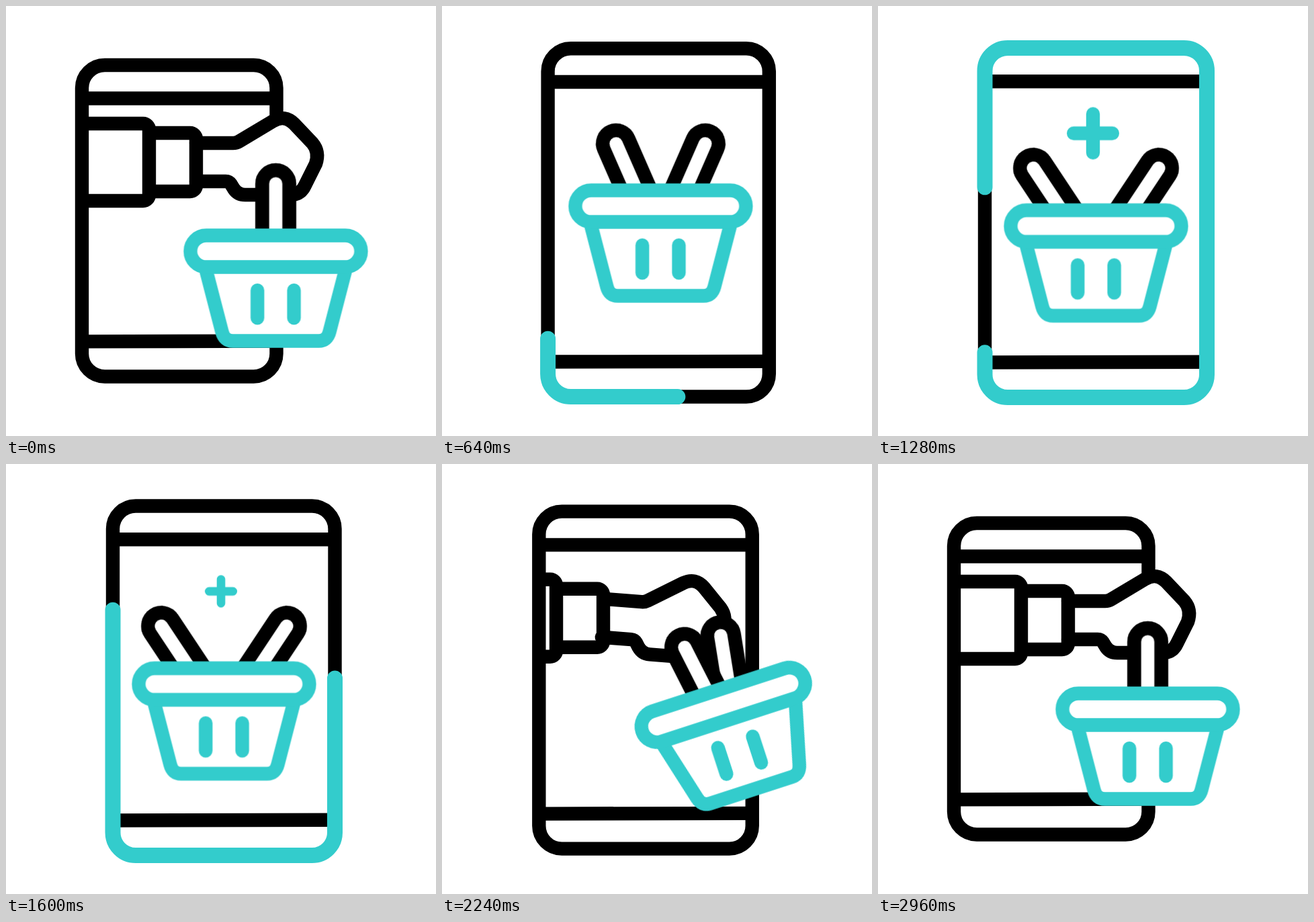
Write an HTML page without scripts that moves like this. It is 640 px wide and 640 px high and loops after 3 s.

```html
<!DOCTYPE html>
<html lang="en">
<head>
<meta charset="utf-8">
<title>Add to basket</title>
<style>
@property --turn { syntax: '<number>'; inherits: false; initial-value: -36; }
@property --head { syntax: '<number>'; inherits: false; initial-value: 0; }
@property --tail { syntax: '<number>'; inherits: false; initial-value: 0; }

html, body { margin: 0; width: 100%; height: 100%; overflow: hidden; background: #fff; }
svg { display: block; width: 100vw; height: 100vh; }

path, rect { fill: none; stroke: #000; stroke-width: 20.4; }
.teal, .teal * { stroke: #3cc; }
.solid { fill: #fff; }
.round { stroke-linecap: round; stroke-linejoin: round; }

.phone, .lines, .trace, .edge, .arm, .hand, .basket, .handle, .plus {
  animation: 3s cubic-bezier(.333, 0, .667, 1) infinite;
}

/* phone */
.phone { animation-name: body; }
.lines { animation-name: lines; }
.edge { animation-name: edge; }
@keyframes body {
  0%, 3.667%, 81.867%, 100% {
    d: path('M368.5 551.5H147A34 34 0 0 1 113 517.5V122A34 34 0 0 1 147 88H368.5A34 34 0 0 1 402.5 122V517.5A34 34 0 0 1 368.5 551.5Z');
  }
  23.433%, 70.367% {
    d: path('M455.5 582.5H193A34 34 0 0 1 159 548.5V96.5A34 34 0 0 1 193 62.5H455.5A34 34 0 0 1 489.5 96.5V548.5A34 34 0 0 1 455.5 582.5Z');
  }
}
@keyframes lines {
  0%, 3.667%, 81.867%, 100% { d: path('M113 137.5L402.5 137.5M113 499.4L402.5 498.6'); }
  23.433%, 70.367% { d: path('M159 112.3L489.5 112.3M159 530.5L489.5 529.8'); }
}
@keyframes edge {
  0%, 3.667%, 81.867%, 100% { transform: translateX(113px); }
  23.433%, 70.367% { transform: translateX(159px); }
}

/* line running round the phone */
.trace {
  --span: calc((var(--head) - var(--tail)) * 1642px);
  stroke-width: 23;
  stroke-dasharray: var(--span) calc(1642px - var(--span));
  stroke-dashoffset: calc((var(--turn) + 1642 * var(--tail)) * -1px);
  animation-name: body, turn, head, tail, show;
}
@keyframes turn { 0%, 9.9% { --turn: -36; } 49.567%, 100% { --turn: 647; } }
@keyframes head { 0%, 10.533% { --head: 0; } 53.033%, 100% { --head: 1; } }
@keyframes tail { 0%, 42.233% { --tail: 0; } 66.667%, 100% { --tail: 1; } }
@keyframes show {
  0%, 10.65% { opacity: 0; }
  10.66%, 66.3% { opacity: 1; }
  66.31%, 100% { opacity: 0; }
}

/* arm */
.arm { animation-name: arm; }
.hand { transform-origin: 283px 232px; animation-name: tilt; }
@keyframes arm {
  0% { translate: 0 0; }
  2.667% { translate: 0 0; animation-timing-function: cubic-bezier(.333, 0, .667, .333); }
  21.333% { translate: -322px -38px; }
  64.333% { translate: -322px -24px; animation-timing-function: cubic-bezier(.333, .667, .667, 1); }
  80.667%, 100% { translate: 0 0; }
}
@keyframes tilt {
  0%, 2.667%, 80.667%, 100% { rotate: 0deg; }
  10.5%, 75% { rotate: 4.5deg; }
}

/* basket: hangs from the grip point */
.basket { animation-name: carry, swing; }
@keyframes carry {
  0%, 2.667% { translate: 401.5px 245px; }
  22.667% { translate: 324.5px 177px; }
  32% { translate: 324.5px 207.5px; }
  66% { translate: 324.5px 207.5px; animation-timing-function: cubic-bezier(.4, 0, .7, .8); }
  74.667% { translate: 381.5px 244.4px; animation-timing-function: linear; }
  77.333% { translate: 390px 245px; animation-timing-function: cubic-bezier(.3, .4, .6, 1); }
  81.333%, 100% { translate: 401.5px 245px; }
}
@keyframes swing {
  0%, 66.5% { rotate: 0deg; }
  74.667%, 76% { rotate: -18deg; }
  98.2%, 100% { rotate: 0deg; }
}
.handle { animation-name: open; }
@keyframes open {
  0% { transform: translate(0px, -100.5px) rotate(0deg); }
  13.333% { transform: translate(0px, -100.5px) rotate(0deg); animation-timing-function: cubic-bezier(.4, 0, .7, .75); }
  21.333% { transform: translate(-66px, -93px) rotate(-23.5deg); animation-timing-function: cubic-bezier(.3, .4, .6, 1); }
  25.333% { transform: translate(-93.3px, -86.3px) rotate(-33.6deg); }
  66% { transform: translate(-93.3px, -86.3px) rotate(-33.6deg); animation-timing-function: cubic-bezier(.4, 0, .7, .75); }
  74.667% { transform: translate(-28.5px, -99.3px) rotate(-9deg); animation-timing-function: cubic-bezier(.3, .4, .6, 1); }
  79.667%, 100% { transform: translate(0px, -100.5px) rotate(0deg); }
}

.plus { animation-name: pop; }
@keyframes pop {
  0%, 28% { transform: translate(320px, 189.5px) scale(0); }
  36%, 50% { transform: translate(320px, 189.5px) scale(1); }
  58%, 100% { transform: translate(320px, 189.5px) scale(0); }
}
</style>
</head>
<body>
<svg viewBox="0 0 640 640">
  <defs>
    <clipPath id="inside"><rect class="edge" width="640" height="640"/></clipPath>
    <path id="loop" class="solid" d="M-20 95V0A20 20 0 0 1 20 0V95"/>
  </defs>

  <path class="lines"/>
  <path class="phone"/>
  <path class="trace teal round" pathLength="1642"/>

  <g clip-path="url(#inside)">
    <g class="arm">
      <path class="hand solid round" d="M283 204H338Q343 204 347 201.5L398 171Q415 161.5 429 175.5L456 204Q467 217 461 235L445 267Q439 280 426 281H356Q345 281 339 272L335 265.5Q332 261 327 261H283"/>
      <path d="M213 189H274A9 9 0 0 1 283 198V267A9 9 0 0 1 274 276H213"/>
      <path d="M-300 175H204A9 9 0 0 1 213 184V281A9 9 0 0 1 204 290H-300"/>
    </g>
  </g>

  <path class="plus teal round" d="M-28.8 0H28.8M0 -28.8V28.8"/>

  <g class="basket teal">
    <g transform="translate(0 120)">
      <g transform="scale(-1 1)"><g class="handle"><use href="#loop"/></g></g>
      <g class="handle"><use href="#loop"/></g>
      <path class="solid" d="M-105 23.5L-80 120Q-76.5 133.5 -64 133.5H64Q76.5 133.5 80 120L105 23.5"/>
      <rect class="solid" x="-127" y="-23.5" width="254" height="47" rx="23.5"/>
      <path class="round" d="M-27.3 58.2V99.3M27.1 58.2V99.3"/>
    </g>
  </g>
</svg>
</body>
</html>
```
